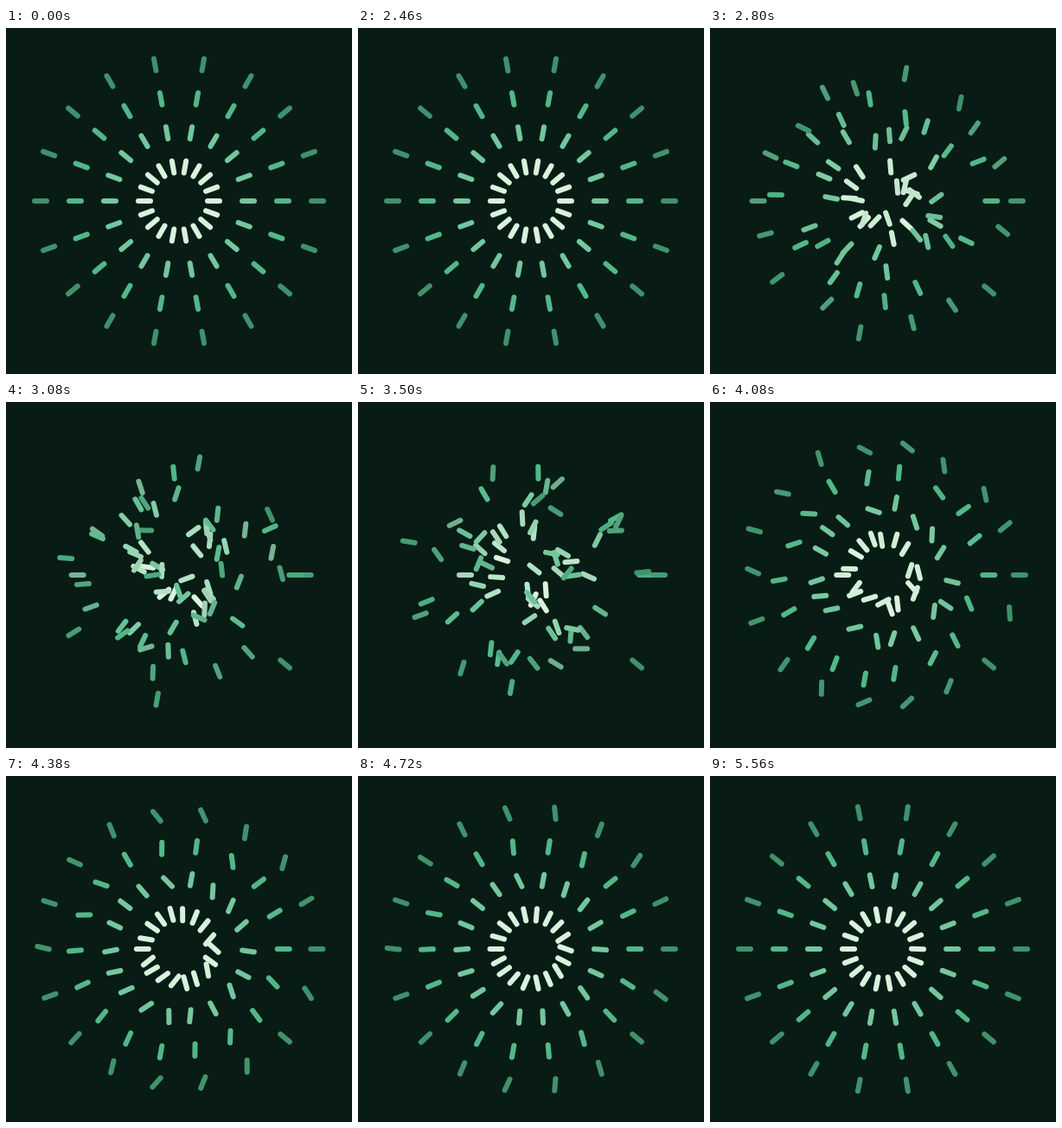
An HTML page with a canvas for the animation above (5620 ms loop, 400 by 400 pixels).

```html
<!DOCTYPE html>
<html lang="en">
<head>
<meta charset="utf-8">
<title>Shuffled sunburst</title>
<style>
  html, body { margin: 0; width: 100%; height: 100%; overflow: hidden; background: #081c15; }
  canvas { display: block; width: 400px; height: 400px; }
</style>
</head>
<body>
<canvas width="400" height="400"></canvas>
<script>
const ctx = document.querySelector('canvas').getContext('2d');
const LOOP = 5620, START = 2440, SPOKES = 18, HALF = 7;
const COLORS = [[216, 243, 220], [116, 198, 157], [82, 183, 136], [64, 145, 108]];

// Slot each dash leaves, listed by the slot it ends in (18 per ring, inner ring first)
const FROM = [
  34, 7, 71, 8, 2, 70, 51, 29, 19, 63, 42, 9, 28, 47, 64, 66, 48, 60,
  57, 58, 50, 4, 10, 37, 52, 67, 11, 41, 12, 46, 62, 0, 68, 23, 6, 27,
  54, 65, 25, 15, 44, 59, 22, 39, 24, 61, 20, 3, 30, 17, 49, 55, 53, 13,
  36, 69, 56, 14, 16, 35, 18, 40, 26, 32, 45, 5, 33, 38, 1, 43, 21, 31
];

const slots = FROM.map((_, i) => {
  const ring = Math.floor(i / SPOKES);
  const angle = (i % SPOKES) * 2 * Math.PI / SPOKES;
  const radius = 40 * (ring + 1);
  return {
    x: 200 + radius * Math.cos(angle),
    y: 200 + radius * Math.sin(angle),
    angle,
    color: COLORS[ring]
  };
});

const mix = (a, b, t) => a + (b - a) * t;

function drawDash(from, to, move, turn) {
  const x = mix(from.x, to.x, move);
  const y = mix(from.y, to.y, move);
  const angle = mix(from.angle, to.angle, turn);
  const dx = HALF * Math.cos(angle), dy = HALF * Math.sin(angle);
  const rgb = from.color.map((c, k) => Math.round(mix(c, to.color[k], move)));
  ctx.strokeStyle = `rgb(${rgb})`;
  ctx.beginPath();
  ctx.moveTo(x - dx, y - dy);
  ctx.lineTo(x + dx, y + dy);
  ctx.stroke();
}

function draw(ms) {
  const t = Math.max(0, ms % LOOP - START) / 1000;
  // The pull toward the new slot grows with time; turning lags at half the rate
  const turn = 1 - Math.exp(-0.535 * t * t);
  const move = 1 - (1 - turn) ** 2;
  ctx.fillStyle = '#081c15';
  ctx.fillRect(0, 0, 400, 400);
  ctx.lineWidth = 6;
  ctx.lineCap = 'round';
  slots.forEach((to, i) => drawDash(slots[FROM[i]], to, move, turn));
}

const begin = performance.now();
function tick() {
  draw(performance.now() - begin);
  requestAnimationFrame(tick);
}
tick();
</script>
</body>
</html>
```
